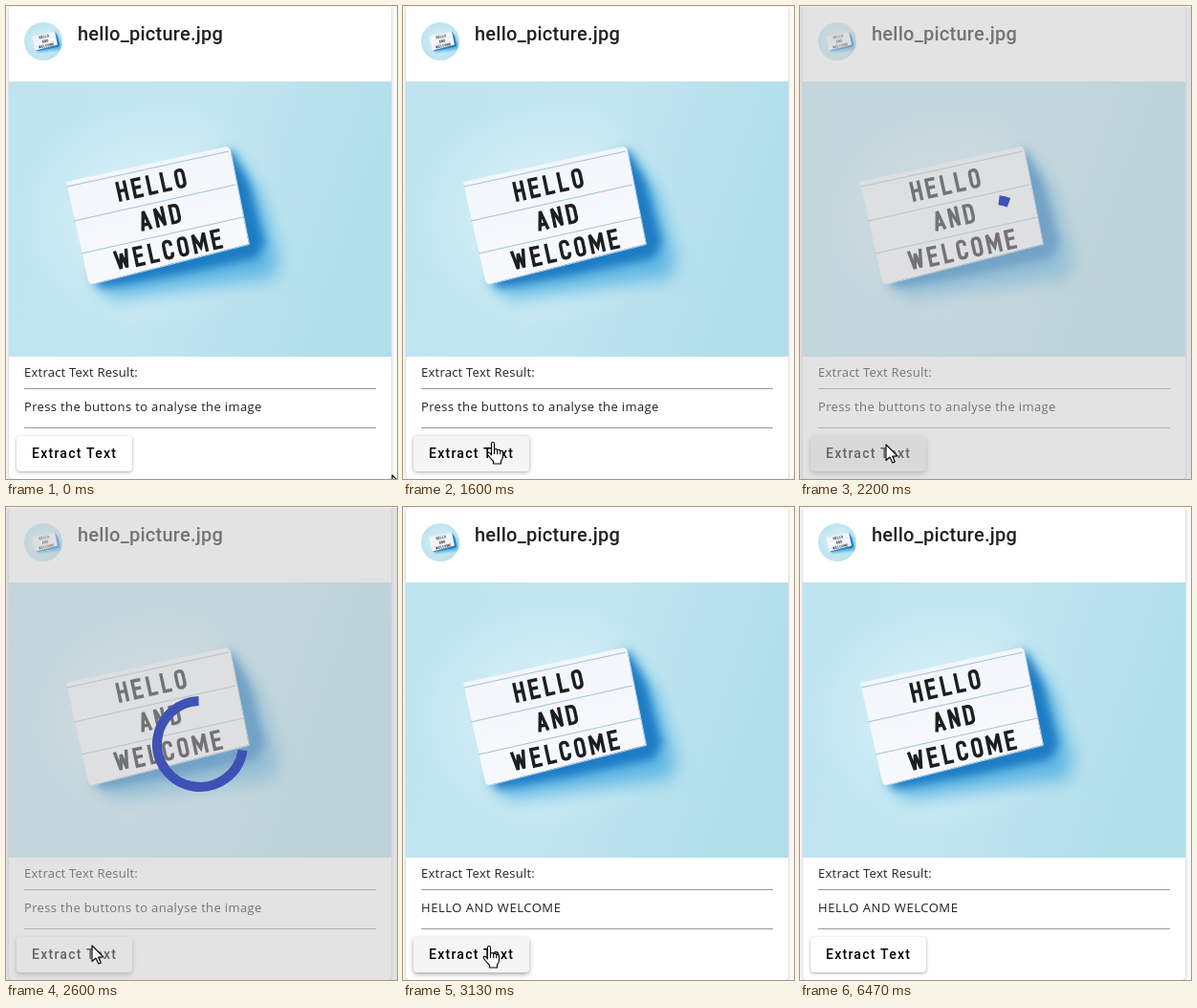
These frames come from a looping animation (409 by 495 pixels, 6540 ms). An HTML page:

```html
<!DOCTYPE html>
<html lang="en">
<head>
<meta charset="utf-8">
<title>Extract text</title>
<style>
  html, body { margin: 0; height: 100%; overflow: hidden; background: #fafafa; }
  svg { display: block; }
  text { fill: #212121; white-space: pre; }
  .roboto { font-family: Roboto, sans-serif; font-weight: 500; }
  .body { font: 13px "Open Sans", "Noto Sans", sans-serif; letter-spacing: .36px; }
  #card { filter: drop-shadow(0 1px 1.5px rgba(0, 0, 0, .25)); }
  .cursor { fill: #fff; stroke: #000; stroke-width: 1.1; stroke-linejoin: round; }
</style>
</head>
<body>
<svg width="409" height="495" viewBox="0 0 409 495">
  <defs>
    <linearGradient id="wall" x2="1" y2=".25">
      <stop stop-color="#bde4ef"/>
      <stop offset=".5" stop-color="#c2e6f1"/>
      <stop offset="1" stop-color="#b2deea"/>
    </linearGradient>
    <radialGradient id="glow">
      <stop offset=".5" stop-color="#e4f6fb" stop-opacity=".4"/>
      <stop offset="1" stop-color="#e4f6fb" stop-opacity="0"/>
    </radialGradient>
    <linearGradient id="face" x2=".3" y2="1">
      <stop stop-color="#f1f5fa"/>
      <stop offset="1" stop-color="#f8f9fd"/>
    </linearGradient>
    <filter id="soft" x="-20%" y="-20%" width="140%" height="140%"><feGaussianBlur stdDeviation="9"/></filter>
    <filter id="tight" x="-20%" y="-20%" width="140%" height="140%"><feGaussianBlur stdDeviation="5"/></filter>
    <clipPath id="frame"><rect x="3" y="79" width="400" height="288"/></clipPath>
    <clipPath id="round"><circle cx="39" cy="37" r="20"/></clipPath>
    <clipPath id="pill"><rect x="11" y="450" width="121" height="37" rx="4"/></clipPath>
    <g id="photo" clip-path="url(#frame)">
      <rect x="3" y="79" width="400" height="288" fill="url(#wall)"/>
      <ellipse cx="152" cy="218" rx="145" ry="120" fill="url(#glow)"/>
      <path d="M236 152L266 194 285 262 281 284 200 295 112 306 92 288z" fill="#62b8e4" filter="url(#soft)"/>
      <path d="M235 150L254 184 271 248 262 264 180 281 100 295 92 288z" fill="#1f7cc4" filter="url(#tight)"/>
      <path d="M63 184L231 147Q234 148 235 152L254 249 90 291Q87 291 86 287z" fill="url(#face)"/>
      <path d="M64 189L233 152M71 225L240 187M79 259L248 221" stroke="#a3c3d6" stroke-width="1.2"/>
      <path d="M235 152L254.500 249.500 90 291.500" fill="none" stroke="#b9d3e6"/>
      <g id="letters" fill="none" stroke="#1c1e22" stroke-width="3.4"/>
    </g>
  </defs>

  <rect width="409" height="495" fill="#fafafa"/>
  <rect id="card" x="3" y=".5" width="400" height="494.5" rx="4" fill="#fff"/>
  <g clip-path="url(#round)">
    <use href="#photo" transform="translate(19 17) scale(.1389) translate(-3 -79)"/>
  </g>
  <text class="roboto" x="75" y="36" font-size="20" letter-spacing=".25">hello_picture.jpg</text>
  <use href="#photo"/>
  <text class="body" x="19" y="388" style="letter-spacing:.25px">Extract Text Result:</text>
  <text class="body" x="19" y="424" id="prompt">Press the buttons to analyse the image</text>
  <text class="body" x="19" y="424" id="result" style="letter-spacing:.54px">HELLO AND WELCOME</text>
  <path d="M19 400.5H387M19 441.5H387" stroke="#9a9a9a"/>

  <rect id="button" x="11" y="450" width="121" height="37" rx="4" fill="#fff"/>
  <g clip-path="url(#pill)">
    <rect id="hover" x="11" y="450" width="121" height="37" fill-opacity=".04"/>
    <circle id="ripple" cx="91" cy="460"/>
  </g>
  <text class="roboto" x="27" y="473" font-size="14" letter-spacing="1.25" style="fill:#000">Extract Text</text>

  <g id="busy">
    <rect y="1" width="409" height="494" fill="#c8c8c8" fill-opacity=".5"/>
    <circle id="spinner" cx="203" cy="248" r="45" fill="none" stroke="#3f51b5" stroke-width="10" pathLength="360"/>
  </g>

  <path id="arrow" class="cursor" d="M0 0V16.5L4 13 6.8 19 9.3 18 6.6 12H12z"/>
  <path id="hand" class="cursor" d="M-1.5 14V2Q-1.5.5 0 .5T1.5 2V8q3-1 3.2.8 2.8-.8 3 .9 2.8-.6 2.8 1.6V15q0 3-2 5v3H.5v-2.5Q-2 18-5.5 13.5-6.5 11.5-4.5 11.3q1.5.2 3 2.7zM1.5 8v5M4.7 8.8v4.4M7.7 9.7v3.5"/>
</svg>
<script>
const LOOP = 6540, STEP = 200 / 3;
const $ = id => document.getElementById(id);
const clamp = v => Math.max(0, Math.min(1, v));
const ramp = (t, a, b) => clamp((t - a) / (b - a));
const show = (id, on) => $(id).setAttribute('display', on ? 'inline' : 'none');

// Sign letters as strokes in a box 21 high: [width, path]
const GLYPHS = {
  H: [11, 'M1.7 0V21M9.3 0V21M1.7 10H9.3'],
  E: [11, 'M10.5 1.7H1.7V19.3H10.5M1.7 10H9.5'],
  L: [10, 'M1.7 0V19.3H10'],
  O: [11, 'M1.7 6Q1.7 1.7 5.5 1.7T9.3 6V15Q9.3 19.3 5.5 19.3T1.7 15z'],
  A: [11, 'M1 21L5.5 1 10 21M2.5 15H8.5'],
  N: [11, 'M1.7 21V1L9.3 20V0'],
  D: [11, 'M1.7 1.7H5Q9.3 1.7 9.3 6V15Q9.3 19.3 5 19.3H1.7z'],
  W: [15, 'M1.3 0L4.3 19.5 7.5 4 10.7 19.5 13.7 0'],
  C: [11, 'M9.3 7V6Q9.3 1.7 5.5 1.7T1.7 6V15Q1.7 19.3 5.5 19.3T9.3 15V14'],
  M: [15, 'M1.7 21V1L7.5 15 13.3 1V21']
};

function word(s, cx, cy) {
  const width = [...s].reduce((w, c) => w + GLYPHS[c][0] + 5, -5);
  let x = -width / 2, out = '';
  for (const c of s) {
    out += `<path transform="translate(${x} -10.5)" d="${GLYPHS[c][1]}"/>`;
    x += GLYPHS[c][0] + 5;
  }
  return `<g transform="translate(${cx} ${cy}) rotate(-12.3)">${out}</g>`;
}
$('letters').innerHTML = word('HELLO', 152, 187) + word('AND', 161, 220.8) + word('WELCOME', 170, 255);

// Pointer path: time, x, y
const PATH = [
  [0, 404, 491], [300, 399, 490], [670, 382, 489], [900, 290, 468], [1130, 180, 442],
  [1250, 138, 437], [1333, 117, 443], [1467, 98, 453], [1600, 94, 456], [1800, 90, 459],
  [5200, 90, 459], [5267, 89, 459], [5467, 89, 459], [5733, 88, 498], [LOOP, 88, 498]
];

function pointer(t) {
  const i = Math.max(1, PATH.findIndex(p => p[0] >= t));
  const [a, b] = [PATH[i - 1], PATH[i]], k = ramp(t, a[0], b[0]);
  return [a[1] + (b[1] - a[1]) * k, a[2] + (b[2] - a[2]) * k];
}

// cubic-bezier(.4, 0, .2, 1)
function ease(x) {
  let lo = 0, hi = 1, s = .5;
  for (let i = 0; i < 20; i++) {
    s = (lo + hi) / 2;
    const u = 1 - s;
    if (1.2 * s * u * u + .6 * s * s * u + s ** 3 < x) lo = s; else hi = s;
  }
  return s * s * (3 - 2 * s);
}

// Arc grows and shrinks around a centre that turns steadily plus 135° per half cycle
function spin(ms) {
  const half = 4000 / 6, n = Math.floor(ms / half), k = ease(ms / half - n);
  const reach = 5 + 135 * (n % 2 ? 1 - k : k);
  const mid = -90 + 360 * ms / 1568 + 135 * (n + k);
  $('spinner').setAttribute('stroke-dasharray', `${2 * reach} 360`);
  $('spinner').setAttribute('transform', `rotate(${mid - reach} 203 248)`);
}

function draw(now) {
  const t = Math.floor((now % LOOP + 4) / STEP) * STEP;
  const busy = t > 2150 && t < 3120;
  const pointing = t > 1390 && !(t > 2150 && t < 3060);

  show('busy', busy);
  if (busy) spin(t - 2150);
  show('prompt', t < 3120);
  show('result', t >= 3120);

  show('hover', pointing && t < 5730 && !busy);
  const lift = ramp(t, 1330, 1700) - .5 * ramp(t, 5460, 5730) - .5 * ramp(t, 6400, 6460);
  $('button').style.filter = `drop-shadow(0 ${1.5 + lift / 2}px ${1.6 + lift * .9}px rgba(0,0,0,.35))`;
  $('ripple').setAttribute('r', 85 * ease(ramp(t, 1940, 2165)));
  $('ripple').setAttribute('fill-opacity', .08 * ramp(t, 1930, 2000) * (1 - ramp(t, 2270, 2600)));

  const [x, y] = pointer(t);
  show('hand', pointing);
  show('arrow', !pointing);
  $(pointing ? 'hand' : 'arrow').setAttribute('transform', `translate(${x} ${y})`);
}

const start = performance.now();
function tick() {
  draw(performance.now() - start);
  requestAnimationFrame(tick);
}
tick();
</script>
</body>
</html>
```
